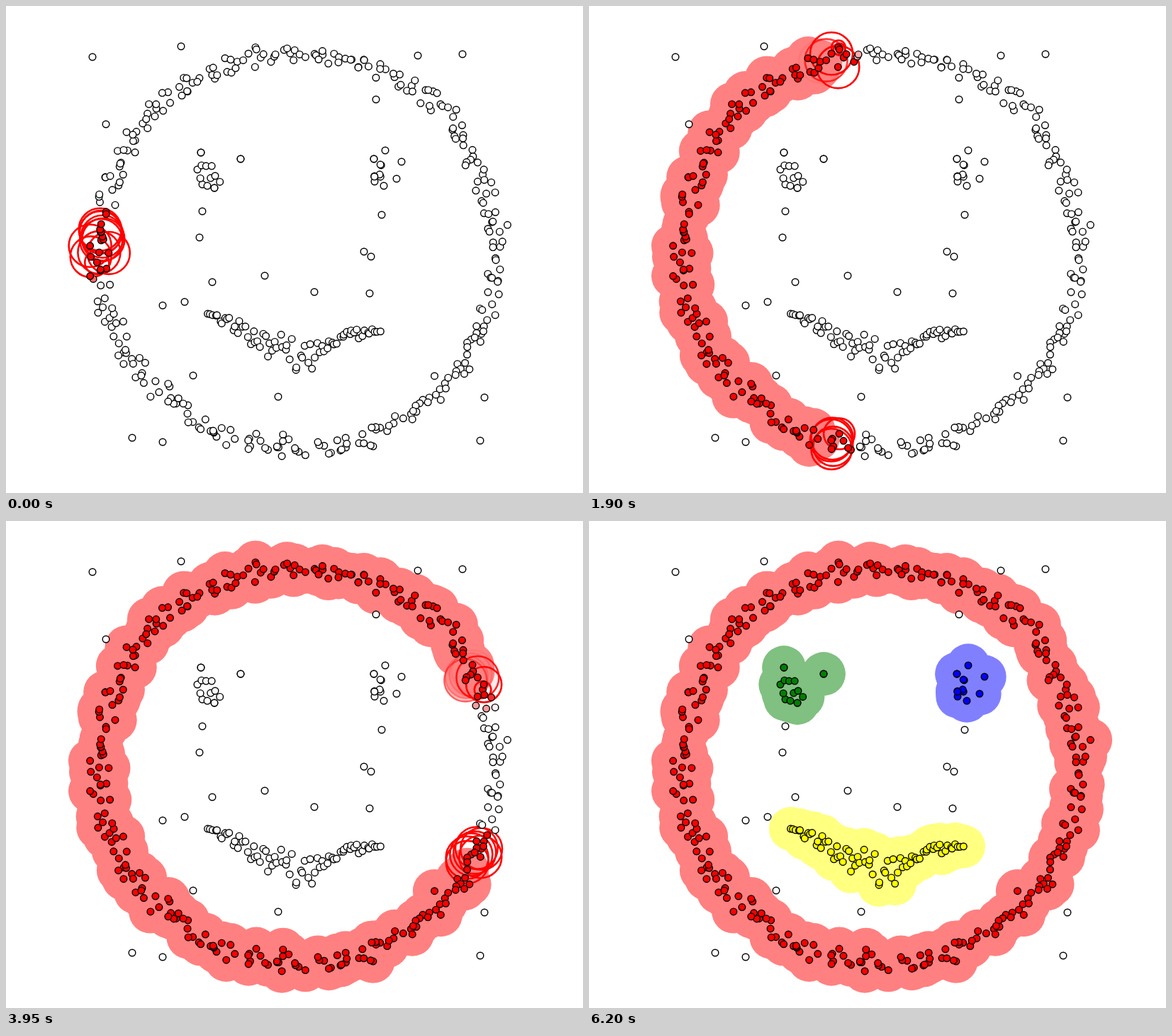
An HTML page with a canvas that plays this animation: 814x688 px, repeating every 6.65 s.

```html
<!DOCTYPE html>
<html lang="en">
<head>
<meta charset="utf-8">
<title>Density clustering</title>
<style>
html, body { margin: 0; width: 814px; height: 688px; overflow: hidden; background: #fff; }
canvas { display: block; }
</style>
</head>
<body>
<canvas id="stage" width="814" height="688"></canvas>
<script>
const ctx = document.getElementById('stage').getContext('2d');
const LOOP = 6650, STEP = 50, LAST = 6200;
const EPS = 30, GROW = 80, HOLD = 140, FADE = 70;
const CX = 412, CY = 345, RING = 280;

let seed = 11;
const random = () => (seed = (seed * 16807) % 2147483647) / 2147483647;
const spread = size => (random() - 0.5) * size;
const pick = list => list[Math.floor(random() * list.length)];
const make = (count, rule) => Array.from({ length: count }, (_, i) => rule(i));

const ringCount = 320;
const ring = make(ringCount, i => {
  const angle = i / ringCount * 2 * Math.PI + spread(0.08);
  const radius = RING + spread(19) + spread(19);
  return [CX + radius * Math.cos(angle), CY + radius * Math.sin(angle)];
});

const mouth = make(70, i => {
  const x = 283 + 246 * (i + random()) / 70;
  const bulge = Math.cos((x - 406) / 123 * Math.PI / 2) ** 2;
  return [x, 448 + 44 * bulge + 0.08 * (x - 406) + spread(10 + 40 * bulge)];
});

// An eye is a few corners filled with points lying between pairs of them.
const eye = (corners, count) => corners.concat(make(count, () => {
  const a = pick(corners), b = pick(corners), k = 0.2 + random() * 0.6;
  return [a[0] + (b[0] - a[0]) * k, a[1] + (b[1] - a[1]) * k];
}));
const leftEye = eye([[275, 207], [331, 216], [270, 231], [277, 252], [294, 257]], 11);
const rightEye = eye([[535, 204], [519, 216], [558, 220], [520, 248], [533, 254], [551, 244]], 7);

const noise = [[122, 72], [247, 57], [581, 70], [644, 68], [522, 132], [141, 167], [277, 290], [273, 327],
  [530, 295], [505, 347], [515, 354], [365, 381], [291, 390], [435, 404], [513, 406], [221, 423],
  [252, 418], [264, 522], [384, 552], [178, 610], [221, 616], [675, 553], [669, 614]];

// The search leaves the left edge and takes turns between the upper and lower arm.
function ringTime(p) {
  const arc = Math.abs(Math.atan2(p.y - CY, CX - p.x)) * 30 / Math.PI;
  const layer = Math.floor(arc);
  return -165 + 156 * (layer + (arc - layer + (p.y > CY ? 1 : 0)) / 2);
}

function cluster(coords, color, area, visitTime) {
  const points = coords.map(([x, y]) => ({ x, y }));
  points.forEach((p, i) => p.visit = visitTime(p, i));
  for (const p of points) {
    const near = points.filter(q => Math.hypot(p.x - q.x, p.y - q.y) <= EPS);
    p.reached = Math.min(...near.map(q => q.visit));
  }
  return { points, color, area };
}

const clusters = [
  cluster(ring, '#f00', '#ff8080', ringTime),
  cluster(rightEye, '#00f', '#8080ff', (p, i) => 4520 + i * 12),
  cluster(leftEye, '#008000', '#80c080', (p, i) => 4680 + i * 12),
  cluster(mouth, '#ff0', '#ffff80', p => 4860 + Math.abs(p.x - 384) * 7),
  cluster(noise, '#808080', null, (p, i) => 5760 + i * 9)
];

const clamp = v => Math.max(0, Math.min(1, v));
const ease = v => v < 0.5 ? 4 * v ** 3 : 1 - 4 * (1 - v) ** 3;
const progress = (t, start, duration) => ease(clamp((t - start) / duration));

function circle(p, r, alpha) {
  ctx.globalAlpha = alpha;
  ctx.beginPath();
  ctx.arc(p.x, p.y, r, 0, 2 * Math.PI);
}

function drawAreas({ points, area }, t) {
  if (!area) return;
  ctx.fillStyle = area;
  for (const p of points) {
    const alpha = progress(t, p.visit + HOLD, FADE);
    if (alpha > 0) { circle(p, EPS + 0.7, alpha); ctx.fill(); }
  }
}

function drawRings({ points, color }, t) {
  ctx.strokeStyle = color;
  ctx.lineWidth = 2.6;
  for (const p of points) {
    const alpha = 1 - progress(t, p.visit + HOLD, FADE);
    if (t > p.visit && alpha > 0) { circle(p, EPS * progress(t, p.visit, GROW), alpha); ctx.stroke(); }
  }
}

function drawDots({ points, color, area }, t) {
  ctx.strokeStyle = '#000';
  ctx.lineWidth = 1.4;
  for (const p of points) {
    circle(p, 4.8, 1);
    ctx.fillStyle = '#fff';
    ctx.fill();
    if (area) {
      ctx.globalAlpha = progress(t, p.reached, 80);
      ctx.fillStyle = color;
      ctx.fill();
    }
    ctx.globalAlpha = 1;
    ctx.stroke();
  }
}

function draw(t) {
  ctx.globalAlpha = 1;
  ctx.fillStyle = '#fff';
  ctx.fillRect(0, 0, 814, 688);
  ctx.save();
  ctx.beginPath();
  ctx.rect(0, 24, 814, 664);
  ctx.clip();
  clusters.forEach(c => drawAreas(c, t));
  clusters.forEach(c => drawRings(c, t));
  ctx.restore();
  clusters.forEach(c => drawDots(c, t));
}

function tick() {
  const t = performance.now() % LOOP;
  draw(Math.min(LAST, Math.floor(t / STEP) * STEP));
  requestAnimationFrame(tick);
}
tick();
</script>
</body>
</html>
```
